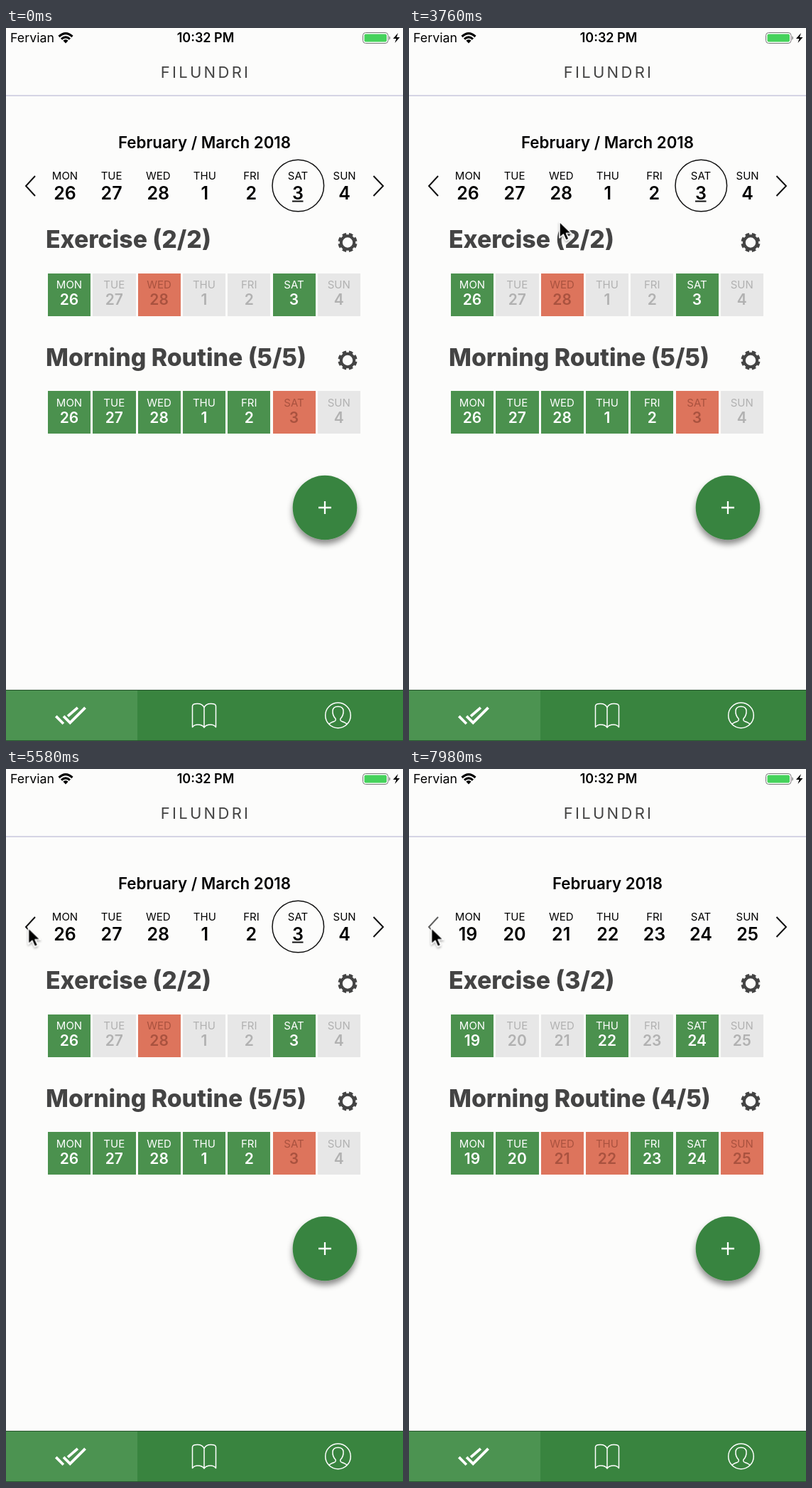
Recreate the animation shown at these times as an HTML page. Size 559 by 1002 pixels, loop 8000 ms.

```html
<!DOCTYPE html>
<html lang="en">
<head>
<meta charset="utf-8">
<title>Habit week</title>
<style>
html, body { margin: 0; width: 100%; height: 100%; overflow: hidden; background: #fcfcfb; }
svg { display: block; width: 100%; height: 100%; font-family: Inter, "Liberation Sans", sans-serif; }
.line { fill: none; stroke: #111; stroke-width: 2; }
.icon { fill: none; stroke: #fff; stroke-width: 1.5; stroke-linejoin: round; }
.mid { text-anchor: middle; }
.semi { font-weight: 600; }
.day { font-size: 15px; }
.heading { font-size: 33.8px; font-weight: 800; fill: #444; }
.gear { fill: none; stroke: #444; }
.now { animation: leave 8s step-end infinite; }
.before { animation: arrive 8s step-end infinite; }
.back { animation: press 8s linear infinite; }
.cursor { animation: travel 8s linear infinite; }
@keyframes leave { 0% { opacity: 1; } 98.5%, 100% { opacity: 0; } }
@keyframes arrive { 0% { opacity: 0; } 98.5%, 100% { opacity: 1; } }
@keyframes press {
  0%, 78.75% { opacity: 1; }
  80.6%, 98% { opacity: .2; }
  100% { opacity: .73; }
}
@keyframes travel {
  0%, 35% { transform: translate(565px, 368px); animation-timing-function: ease-out; }
  38.5%, 40.5% { transform: translate(462.5px, 328px); animation-timing-function: ease-in-out; }
  51% { transform: translate(103px, 247px); }
  54.5% { transform: translate(97px, 240.5px); animation-timing-function: ease-in-out; }
  61.5% { transform: translate(51px, 233px); animation-timing-function: ease-out; }
  66.5%, 100% { transform: translate(30.5px, 222.5px); }
}
</style>
</head>
<body>
<svg viewBox="0 0 559 1002">
  <defs>
    <filter id="shadow" x="-30%" y="-30%" width="160%" height="170%">
      <feDropShadow dx="0" dy="6" stdDeviation="4" flood-color="#000" flood-opacity=".45"/>
    </filter>
    <filter id="soft" x="-50%" y="-50%" width="220%" height="220%">
      <feDropShadow dx="0" dy="2" stdDeviation="1.5" flood-color="#000" flood-opacity=".3"/>
    </filter>
    <g id="gear" class="gear">
      <circle r="9.2" stroke-width="4"/>
      <circle r="12" stroke-width="3.2" pathLength="16" stroke-dasharray="1.2 .8" stroke-dashoffset="-.4"/>
    </g>
  </defs>
  <rect width="559" height="1002" fill="#fcfcfb"/>

  <g id="status">
    <text x="6" y="20" font-size="17.8">Fervian</text>
    <g fill="none" stroke="#000" stroke-width="3.1">
      <path d="M74.5 12Q84 3.3 93.5 12"/>
      <path d="M78 15.6Q84 10.3 90 15.6"/>
    </g>
    <path d="M80.4 17.7Q84 14.8 87.6 17.7L84 21.5Z"/>
    <text class="mid semi" x="281" y="20" font-size="18">10:32 PM</text>
    <rect x="502.5" y="6.5" width="35.5" height="15" rx="4" fill="#fff" stroke="#777"/>
    <rect x="504.5" y="8.5" width="31.5" height="11" rx="2" fill="#45d25b"/>
    <path d="M539.5 11q3 3 0 6z" fill="#777"/>
    <path d="M552 7l-7 8h4.5l-2 6 7-8h-4.5z"/>
  </g>

  <text class="mid" x="281" y="70" font-size="22" letter-spacing="3.3" fill="#444">FILUNDRI</text>
  <path d="M0 95H559" stroke="#c9c7dc" stroke-width="1.3"/>

  <path class="line back" d="M41 208L28 222L41 236"/>
  <path class="line" d="M517.5 208L531 222L517.5 236"/>
  <g id="weeks"></g>
  <use href="#gear" x="481" y="301.5"/>
  <use href="#gear" x="481" y="467"/>

  <circle cx="449" cy="674" r="45.3" fill="#39843f" filter="url(#shadow)"/>
  <path d="M440 674H458M449 665V683" stroke="#fff" stroke-width="2.3"/>

  <g id="tabs">
    <rect y="930" width="559" height="72" fill="#39843f"/>
    <rect y="930" width="185" height="72" fill="#4c9351"/>
    <path d="M0 930.5H559M0 1001.5H559" stroke="#28552f"/>
    <path transform="translate(68.2 943.2) scale(1.89)" fill="none" stroke="#fff" stroke-width="2"
      d="M1.12 12.7L6.7 18.3M6.78 12.7L11.66 17.58L22.95 6.3M9.95 12.63L17.3 6.3"/>
    <path class="icon" d="M279 955Q276.500 949.500 269.500 949.500Q262.500 949.500 262.500 953V982.500Q265 979 270 979Q276.500 979 279 983Q281.500 979 288 979Q293 979 295.500 982.500V953Q295.500 949.500 288.500 949.500Q281.500 949.500 279 955V983"/>
    <circle class="icon" cx="467.5" cy="966" r="17.8"/>
    <path class="icon" d="M455 978.5Q456 976.5 462 974.5Q465 973.5 464 970.5Q459.5 966 460 959.5Q460.5 953.5 467.5 953.5Q474.5 953.5 475 959.5Q475.5 966 471 970.5Q470 973.5 473 974.5Q479 976.5 480 978.5"/>
  </g>

  <g class="cursor">
    <path d="M1 1V23.5L6.4 18.8L10 27L14.2 25.2L10.6 17.3H18Z" filter="url(#soft)"
      stroke="#fff" stroke-width="1.6" stroke-linejoin="round"/>
  </g>
</svg>
<script>
const days = ["MON", "TUE", "WED", "THU", "FRI", "SAT", "SUN"];
// State letters: g = done, r = missed, n = neutral
const palette = {
  g: ["#4b914e", "#fff"],
  r: ["#dd745c", "#a9523f"],
  n: ["#e7e7e7", "#b1b1b1"]
};

const label = (cls, x, y, text, extra = "") =>
  `<text class="${cls}" x="${x}" y="${y}" ${extra}>${text}</text>`;

function habit(title, states, dates, top) {
  const boxes = days.map((day, i) => {
    const [fill, ink] = palette[states[i]];
    const x = 59 + 63.3 * i;
    return `<rect x="${x}" y="${top}" width="60.2" height="60" fill="${fill}" shape-rendering="crispEdges"/>` +
      `<g fill="${ink}">` +
      label("mid day", x + 30, top + 21.5, day) +
      label("mid semi", x + 30, top + 44.5, dates[i], 'font-size="21"') + "</g>";
  });
  return label("heading", 56, top - 35.5, title) + boxes.join("");
}

function week(cls, month, dates, exercise, routine, today) {
  const header = days.map((day, i) => {
    const x = 83 + 65.6 * i;
    return label("mid day", x, 213, day) +
      label("mid semi", x, 240.5, dates[i], 'font-size="25"');
  }).join("");
  const marker = today
    ? '<circle cx="411.3" cy="221.5" r="36.3" class="line" style="stroke-width:1.5"/>' +
      '<path class="line" d="M403 243.5H418.5"/>'
    : "";
  return `<g class="${cls}">` +
    label("mid semi", 279.5, 169, month, 'font-size="22.3"') + header + marker +
    habit(`Exercise (${exercise[0]})`, exercise[1], dates, 344.5) +
    habit(`Morning Routine (${routine[0]})`, routine[1], dates, 510) + "</g>";
}

document.getElementById("weeks").innerHTML =
  week("now", "February / March 2018", [26, 27, 28, 1, 2, 3, 4],
    ["2/2", "gnrnngn"], ["5/5", "gggggrn"], true) +
  week("before", "February 2018", [19, 20, 21, 22, 23, 24, 25],
    ["3/2", "gnngngn"], ["4/5", "ggrrggr"], false);
</script>
</body>
</html>
```
